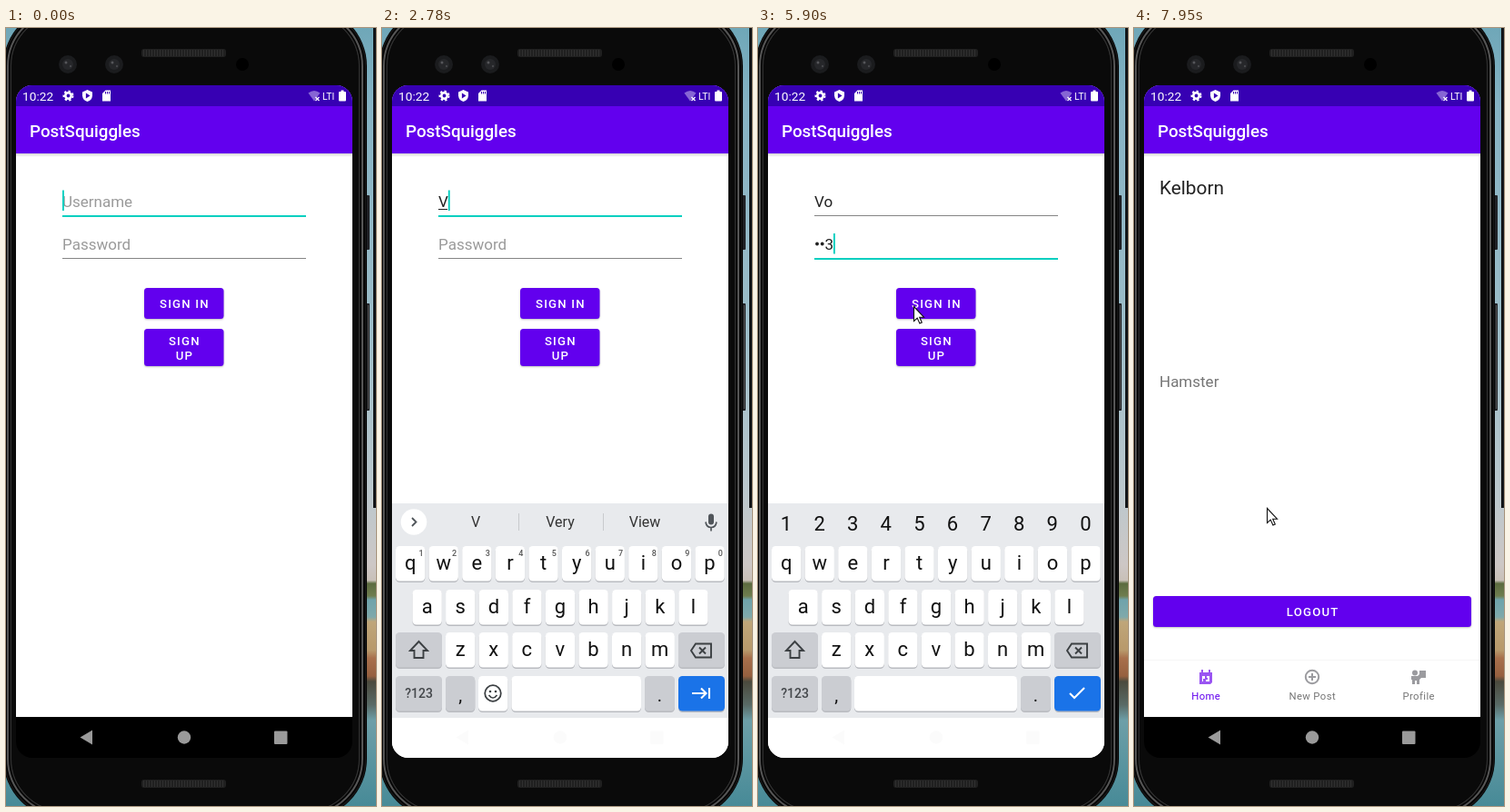
These frames come from a looping animation (407 px wide and 856 px high, 8 s). An HTML page with a canvas:

```html
<!DOCTYPE html>
<html lang="en">
<head>
<meta charset="utf-8">
<title>Sign-in demo</title>
<style>
html, body { margin: 0; width: 100%; height: 100%; overflow: hidden; background: #0a0a0a; }
canvas { display: block; }
</style>
</head>
<body>
<canvas id="stage" width="407" height="856"></canvas>
<script>
const ctx = document.getElementById('stage').getContext('2d');
const LOOP = 8000, STEP = 70, PURPLE = '#6200ee', TEAL = '#03cfc0', INK = '#50555a';
const BODY = 17, CLOSED = 236, KEYS_TOP = 523;

// ---- drawing helpers ----
function rect(x, y, w, h, color, r = 0) {
  ctx.fillStyle = color;
  ctx.beginPath();
  ctx.roundRect(x, y, w, h, r);
  ctx.fill();
}
function disc(x, y, r, color) {
  ctx.fillStyle = color;
  ctx.beginPath();
  ctx.arc(x, y, r, 0, 7);
  ctx.fill();
}
function ring(x, y, r, color, width) {
  ctx.strokeStyle = color;
  ctx.lineWidth = width;
  ctx.beginPath();
  ctx.arc(x, y, r, 0, 7);
  ctx.stroke();
}
function shape(x, y, d, fill, stroke, width = 1) {
  ctx.save();
  ctx.translate(x, y);
  const path = new Path2D(d);
  if (fill) { ctx.fillStyle = fill; ctx.fill(path); }
  if (stroke) { ctx.strokeStyle = stroke; ctx.lineWidth = width; ctx.stroke(path); }
  ctx.restore();
}
function text(str, x, y, size, color, { weight = 400, gap = 0, align = 'left' } = {}) {
  ctx.font = `${weight} ${size}px Roboto, sans-serif`;
  ctx.letterSpacing = gap + 'px';
  ctx.textAlign = align;
  ctx.fillStyle = color;
  ctx.fillText(str, x, y);
  return ctx.measureText(str).width;
}
function zoomed(scale, draw) {
  ctx.save();
  ctx.translate(196, 433);
  ctx.scale(scale, scale);
  ctx.translate(-196, -433);
  draw();
  ctx.restore();
}
const within = (t, spans) => spans.some(([a, b]) => t >= a && t < b);
const clamp = v => Math.max(0, Math.min(1, v));

// ---- phone and desktop ----
function desktop() {
  const g = ctx.createLinearGradient(0, 0, 0, 856);
  [[0, '#6fa7b8'], [.1, '#86b3c4'], [.4, '#9dbdc8'], [.6, '#bcc8cd'], [.69, '#cdc7c5'], [.71, '#c9c0b8'],
   [.714, '#5c6b3f'], [.73, '#6f7d4f'], [.735, '#6fa3ab'], [.757, '#7fa9ab'], [.763, '#bfa679'], [.8, '#b8996b'],
   [.81, '#a8704c'], [.833, '#96603f'], [.84, '#4b4a3d'], [.87, '#596a66'], [.89, '#6d9fa8'], [1, '#478a97']
  ].forEach(([at, color]) => g.addColorStop(at, color));
  rect(0, 0, 407, 856, g);
  rect(404, 0, 3, 528, '#15181c');
  rect(404, 0, 1, 528, '#050607');
}
function speaker(y) {
  rect(149, y, 93, 9, '#202020', 3);
  ctx.fillStyle = '#303030';
  for (let x = 151; x < 240; x += 3) ctx.fillRect(x, y + 1, 1, 7);
}
function phone() {
  rect(395, 184, 5, 60, '#202226', 1);
  rect(395, 303, 5, 118, '#202226', 1);
  rect(398, 305, 1, 114, '#555');
  rect(-3, -24, 400, 894, '#050505', 66);
  [[1.5, 1.5, '#161616'], [5, 2, '#565656'], [8.5, 1.5, '#2f2f2f']].forEach(([inset, width, color]) => {
    ctx.strokeStyle = color;
    ctx.lineWidth = width;
    ctx.beginPath();
    ctx.roundRect(-3 + inset, -24 + inset, 400 - 2 * inset, 894 - 2 * inset, 66 - inset);
    ctx.stroke();
  });
  rect(6.5, -14.5, 381, 875, '#0a0a0a', 56);
  speaker(23);
  speaker(827);
  for (const x of [68, 119]) {
    disc(x, 40, 10, '#1b1c1e');
    disc(x, 40, 6, '#26272a');
    disc(x - 2, 38, 1.5, '#55565a');
    disc(x + 3, 42, 1.2, '#454649');
  }
  disc(260, 40, 7, '#000');
}

// ---- system bars ----
function statusIcons() {
  text('10:22', 18, 79.5, 13.7, '#fff');
  ctx.setLineDash([2.3, 2.3]);
  ring(68.5, 74.5, 5, '#fff', 2);
  ctx.setLineDash([]);
  ring(68.5, 74.5, 3.2, '#fff', 2.6);
  shape(89.5, 74.5, 'M0-6.5L5.5-4V0Q5 5 0 6.5Q-5 5-5.5 0V-4Z', '#fff');
  shape(89.5, 74.5, 'M-1.6-3L3 0L-1.6 3Z', '#3700b3');
  shape(110.5, 74.5, 'M-1-6H4.5V6H-4.5V-2.5Z', '#fff');
  for (const x of [109, 111, 113]) rect(x, 70, 1, 2.5, '#3700b3');
  shape(339, 74.5, 'M0 6L-6.5-3Q0-8 6.5-3Z', '#8766d4');
  shape(342.5, 78, 'M-2-2L2 2M2-2L-2 2', null, '#fff', 1.3);
  text('LTI', 348, 78.5, 10.5, '#fff');
  rect(366, 70, 8, 10.5, '#fff', 1);
  rect(368.5, 68.5, 3, 2, '#fff');
}
function navIcons(color) {
  shape(81.5, 780.5, 'M0 0L13.5-8V8Z', color);
  disc(196, 780.5, 7.2, color);
  rect(295, 773.5, 14.5, 14.5, color, 1);
}
function appFrame() {
  rect(11, 63, 370, 696, '#fff');
  const shade = ctx.createLinearGradient(0, 138, 0, 142);
  shade.addColorStop(0, '#d5d5d5');
  shade.addColorStop(1, '#fff');
  rect(11, 137, 370, 5, shade);
  rect(11, 63, 370, 75, PURPLE);
  rect(11, 63, 370, 23, '#3700b3');
  text('PostSquiggles', 26, 119.5, 18.8, '#fff', { weight: 500 });
  rect(11, 758, 370, 45, '#000');
}
function button(x, y, w, h, lines) {
  ctx.save();
  ctx.shadowColor = 'rgba(0,0,0,.25)';
  ctx.shadowBlur = 2;
  ctx.shadowOffsetY = 1;
  rect(x, y, w, h, PURPLE, 3.5);
  ctx.restore();
  lines.forEach((line, i) => text(line, x + w / 2 + .6, y + h / 2 + 5 + (i - (lines.length - 1) / 2) * 16,
    13.2, '#fff', { weight: 500, gap: 1.18, align: 'center' }));
}

// ---- sign-in screen ----
const FOCUS_PASSWORD = 4000;
const USER_KEYS = [[2780, 'V'], [2850, 'Vo']];
const CODE_KEYS = [4480, 4660, 4860];
const CODE_HIDDEN = 6380;
const CARET_OFF = [[380, 880], [1410, 1900], [2580, 2780], [5340, 5860], [6360, 6860]];

// Each field draws its content and returns the x where the caret belongs.
function underline(y, focused) {
  rect(62, y, 268, focused ? 2 : 1, focused ? TEAL : '#858585');
}
function usernameField(t, focused) {
  const user = USER_KEYS.filter(([at]) => t >= at).map(([, s]) => s).pop();
  underline(206, focused);
  if (!user) {
    text('Username', 62, 197, BODY, '#9a9a9a');
    return 62;
  }
  const width = text(user, 62, 197, BODY, '#222');
  if (focused) rect(62, 199, t < 3120 ? 10 : width, 1, '#222');
  return 62 + width;
}
function passwordField(t, focused) {
  const count = CODE_KEYS.filter(k => t >= k).length;
  const dots = t >= CODE_HIDDEN ? count : Math.max(0, count - 1);
  underline(253, focused);
  if (!count) text('Password', 62, 244, BODY, '#9a9a9a');
  for (let i = 0; i < dots; i++) disc(65 + i * 5.7, 237.5, 1.9, '#222');
  const end = 62 + dots * 5.7;
  return count > dots ? end + text(count, end, 244, BODY, '#222') : end;
}
function signIn(t) {
  const onPassword = t >= FOCUS_PASSWORD;
  appFrame();
  const carets = [usernameField(t, !onPassword), passwordField(t, onPassword)];
  if (!within(t, CARET_OFF)) rect(carets[+onPassword], onPassword ? 226 : 178.5, 1.9, 22.5, TEAL);
  button(152, 286, 87.5, 34, ['SIGN IN']);
  button(152, 331, 87.5, 41, ['SIGN', 'UP']);
  if (t >= 6170 && t < 6920) {
    ctx.save();
    ctx.beginPath();
    ctx.roundRect(152, 286, 87.5, 34, 3.5);
    ctx.clip();
    disc(171, 304, 15 + 65 * clamp((t - 6170) / 250), `rgba(255,255,255,${.24 * clamp((6920 - t) / 450)})`);
    ctx.restore();
  }
}

// ---- home screen ----
function home() {
  appFrame();
  text('Kelborn', 28, 182.5, 20.8, '#222');
  text('Hamster', 28, 395, BODY, '#757575');
  button(21, 625, 350, 34, ['LOGOUT']);
  rect(11, 695, 370, 1, '#f6f6f6');
  const label = (str, x, color) => text(str, x, 738.5, 11.3, color, { gap: .4, align: 'center' });
  label('Home', 79.2, PURPLE);
  label('New Post', 196.2, '#757575');
  label('Profile', 313.2, '#757575');
  shape(79, 714, 'M-7-5H-5V-8H-3V-5H3V-8H5V-5H7V6L5 8H-7Z', '#9a55f2');
  shape(79, 715, 'M-4-2H-1V1H-3V4H-4ZM1-2H4V4H0V2H2V0H1Z', '#fff');
  ring(196, 714, 7.2, '#9b9b9f', 2);
  shape(196, 714, 'M-4 0H4M0-4V4', null, '#9b9b9f', 2);
  disc(309, 709.5, 3, '#9b9b9f');
  shape(313, 714, 'M-8-1H-1L1-3V-7H8V1H3L1 3V8H-2V4H-4V8H-7V3H-8Z', '#9b9b9f');
}

// ---- keyboard ----
function key(x, y, w, label, { fill = '#fff', size = 22, weight = 400, color = '#111', dy = 7 } = {}) {
  rect(x, y + 1, w, 39, '#b9bbc0', 4.5);
  rect(x, y, w, 38.5, fill, 4.5);
  text(label, x + w / 2, y + 19 + dy, size, color, { weight, align: 'center' });
}
function toolbar(t, y) {
  const typing = t >= USER_KEYS[0][0];
  if (t < 2450) rect(57, y, 53, 41, '#d8dade');
  disc(35, y + 20.5, 14.3, '#fff');
  shape(35, y + 20.5, typing ? 'M-2-4.5L2.5 0L-2 4.5' : 'M2-4.5L-2.5 0L2 4.5', null, INK, 1.8);
  if (typing) {
    const words = t < 3120 ? ['V', 'Very', 'View'] : ['Vo', 'Vote', 'Vow'];
    words.forEach((w, i) => text(w, 103 + i * 93, y + 26, 16, '#333', { align: 'center' }));
    for (const x of [150, 243]) rect(x, y + 11, 1, 19, '#c8cacd');
  } else {
    ring(82, y + 19, 4.7, INK, 2);
    shape(82, y + 19, 'M3.5 3.5L9 9', null, INK, 2.2);
    shape(136.5, y + 20.5, 'M-7-7H7V3L3 7H-7ZM3 7V3H7M-3.5 1Q0 5 3 1', null, INK, 1.7);
    disc(133.5, y + 17.5, 1.2, INK);
    disc(139.5, y + 17.5, 1.2, INK);
    text('GIF', 189, y + 25.5, 14, INK, { weight: 900, align: 'center', gap: .4 });
    shape(242.5, y + 21, 'M-6.5-7H6.5V8H-6.5ZM-3.5-1H3.5M-3.5 2H3.5M-3.5 5H1', null, INK, 1.6);
    rect(239, y + 11, 7, 5, INK, 1);
    rect(275, y + 10, 1, 21, '#cdcfd2');
    for (const x of [302.5, 308.5, 314.5]) disc(x, y + 20.5, 1.9, INK);
  }
  rect(359, y + 11.5, 6, 12, INK, 3);
  shape(362, y + 20.5, 'M-6 0Q-5 6 0 6Q5 6 6 0M0 6V10', null, INK, 1.7);
}
function keyboard(t, drop) {
  const top = KEYS_TOP + drop, pitch = 36.6, wide = 32.3;
  const numeric = t >= FOCUS_PASSWORD;
  const dark = { fill: '#cbcdd2' };
  rect(11, 758, 370, 45, '#fff');
  rect(11, top, 370, CLOSED, '#e8eaed');
  rect(11, top + CLOSED, 370, 60, '#fff');
  if (numeric) {
    [...'1234567890'].forEach((n, i) => text(n, 31 + i * pitch, top + 29.5, 22, '#111', { align: 'center' }));
  } else toolbar(t, top);
  const row = (letters, x, y) => [...letters].forEach((c, i) => key(x + i * pitch, top + y, wide, c));
  row('qwertyuiop', 15, 47);
  row('asdfghjkl', 33.5, 95);
  row('zxcvbnm', 70, 142);
  if (!numeric) {
    [...'1234567890'].forEach((n, i) => text(n, 43 + i * pitch, top + 58, 9, '#555', { weight: 500, align: 'center' }));
  }
  key(15, top + 142, 51, '', dark);
  shape(40.5, top + 161, 'M0-9L9.5 1H5V9H-5V1H-9.5Z', null, '#3c4043', 1.9);
  key(326, top + 142, 51, '', dark);
  shape(351, top + 162, 'M-11 0L-6-7.5H11V7.5H-6ZM-2-3.5L5 3.5M5-3.5L-2 3.5', null, '#3c4043', 1.9);
  const last = top + 190;
  key(15, last, 51, '?123', { ...dark, size: 14, weight: 500, color: '#44474b', dy: 5 });
  key(70, last, wide, ',', { ...dark, size: 20, dy: 9 });
  key(289, last, wide + .7, '.', { ...dark, size: 20, dy: 9 });
  if (numeric) key(106, last, 179, '');
  else {
    key(106, last, wide, '');
    ring(122, last + 19, 8.8, '#3c4043', 1.8);
    disc(119, last + 17, 1.3, '#3c4043');
    disc(125, last + 17, 1.3, '#3c4043');
    shape(122, last + 21, 'M-4.5 0Q0 6 4.5 0', null, '#3c4043', 1.6);
    key(142.5, last, 142.5, '');
  }
  key(326, last, 51, '', { fill: '#1a73e8' });
  shape(351, last + 19, numeric ? 'M-8 0L-3 5L8-6' : 'M-10 0H5M0-5.5L5.5 0L0 5.5M9-6V6', null, '#fff', 2.1);
}
function keyboardDrop(t) {
  if (t < 2100 || t >= 7130) return CLOSED;
  if (t >= 6990) return CLOSED * ((t - 6920) / 210) ** 2;
  return t < 2380 ? CLOSED * Math.exp(-(t - 2030) / 55.6) : 0;
}

// ---- mouse pointer: [start, end, path points]; empty path hides it ----
const MOVES = [
  [310, 380, [[319, 597], [310, 500]]],
  [640, 1410, [[303, 485], [262, 390], [212, 275], [179, 206], [177.5, 203]]],
  [1480, 1900, [[177, 201], [173, 175], [170, 182], [170, 189]]],
  [2780, 2780, []],
  [3520, 4000, [[170, 190], [150, 203], [122, 228], [116, 231]]],
  [4480, 4480, []],
  [5340, 5830, [[116, 232], [132, 256], [165, 300], [171, 306]]],
  [6030, 6100, [[171, 306], [171, 304]]],
  [6990, 7130, [[171, 304], [173, 303]]],
  [7130, 7480, [[173, 303], [160, 370], [118, 490], [98, 537]]],
  [7810, 7950, [[108, 537], [146, 528]]]
];
function pointer(t) {
  const move = MOVES.filter(([start]) => t >= start).pop();
  if (!move || !move[2].length) return;
  const [start, end, path] = move;
  const held = Math.floor((t - start) / STEP) * STEP;
  const along = clamp(held / (end - start)) * (path.length - 1);
  const i = Math.min(Math.floor(along), path.length - 2), f = along - i;
  const [x, y] = [0, 1].map(k => path[i][k] + (path[i + 1][k] - path[i][k]) * f);
  shape(x + .5, y + .5, 'M0 0V16L3.7 12.6L6.4 18.6L8.8 17.5L6.2 11.7H11Z', '#fff', '#111', 1.1);
}

function draw(t) {
  desktop();
  phone();
  ctx.save();
  ctx.beginPath();
  ctx.roundRect(11, 63, 370, 740, 18);
  ctx.clip();
  const opening = t >= 6990 ? 1 - Math.exp(-(t - 6950) / 126) : 0;
  const settled = t >= 7480;
  if (!settled) zoomed(1 + .05 * opening, () => signIn(t));
  if (opening) {
    ctx.globalAlpha = settled ? 1 : clamp((t - 6960) / 175);
    zoomed(settled ? 1 : .85 + .15 * opening, home);
    ctx.globalAlpha = 1;
  }
  statusIcons();
  const drop = keyboardDrop(t);
  if (drop < CLOSED) keyboard(t, drop);
  navIcons(drop < CLOSED ? (t < 2380 ? '#f4f4f4' : '#fbfbfb') : '#9a9a9a');
  ctx.restore();
  pointer(t);
}

const begin = performance.now();
function tick() {
  draw((performance.now() - begin) % LOOP);
  requestAnimationFrame(tick);
}
tick();
</script>
</body>
</html>
```
